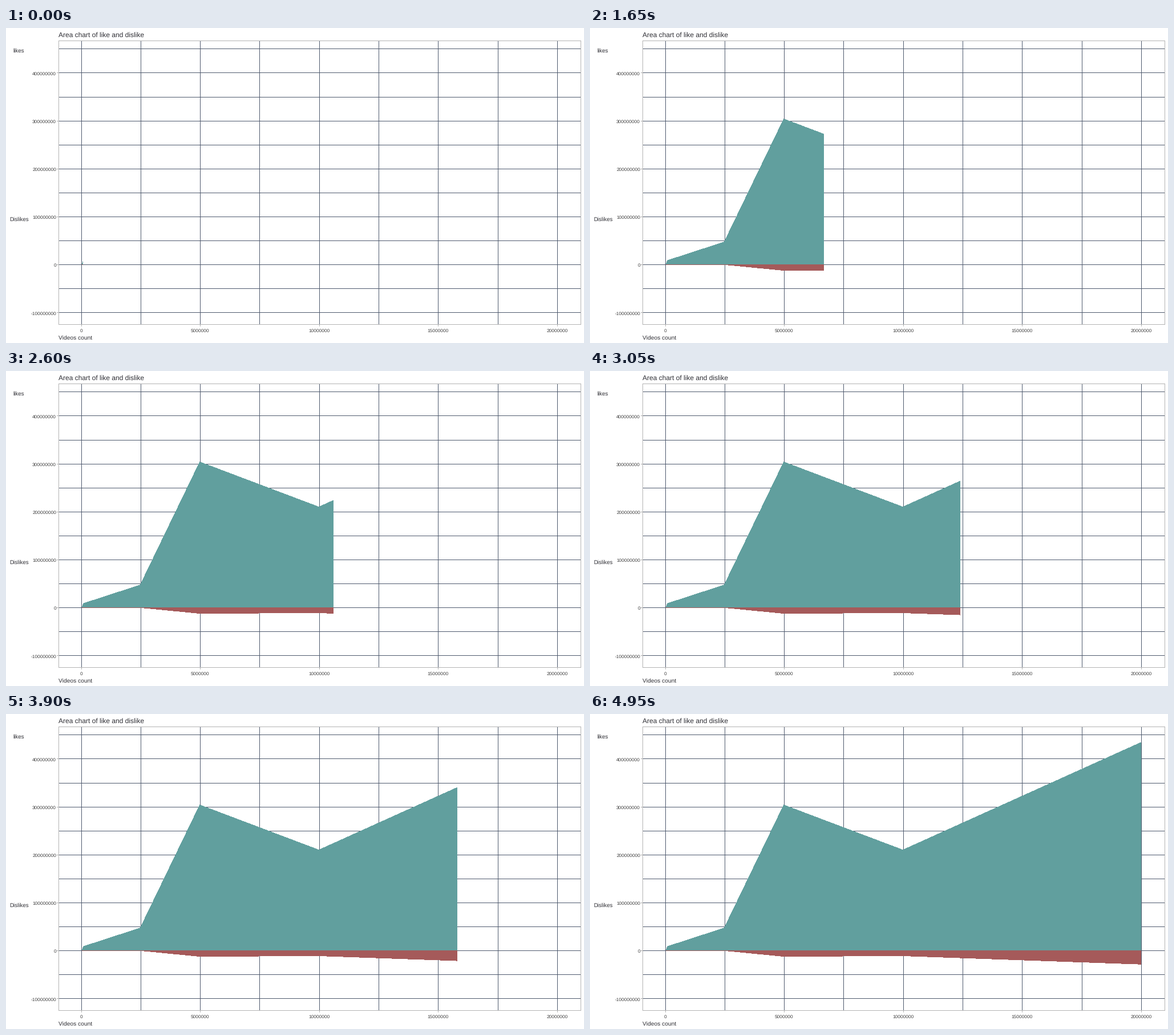
A matplotlib script for the animation above (5 s loop, 1013 by 553 pixels).

```python
import numpy as np
import matplotlib.pyplot as plt
from matplotlib.animation import FuncAnimation
from matplotlib.patches import Polygon, Rectangle

W, H, DPI = 1013, 553, 64
FRAMES, INTERVAL = 100, 50
LEFT, RIGHT, TOP, BOTTOM = 92, 1007, 22, 520
GRID, BORDER = "#4f5a6e", "#b3b3b3"
TEAL, RED = "#619f9e", "#a55a5a"
ZERO_Y = 415

# Chart data in stage pixels, and the frame at which each point is reached
KEY_X = [134.9, 235.4, 339.7, 548.3, 965.5]
KEY_FRAME = [0, 12, 25, 49, 99]
LIKES = [(133.4, 415), (134.9, 410.5), (136, 408.2), (235.4, 375.8),
         (339.7, 159.9), (548.3, 238.9), (965.5, 50.2)]
DISLIKES = [(133.4, 415.1), (235.4, 415.3), (339.7, 425.5),
            (548.3, 424.5), (965.5, 439.2)]

plt.rcParams["font.family"] = "Liberation Sans"
plt.rcParams["text.hinting"] = "none"
fig = plt.figure(figsize=(W / DPI, H / DPI), dpi=DPI, facecolor="white")
ax = fig.add_axes([0, 0, 1, 1])
ax.set_xlim(0, W)
ax.set_ylim(H, 0)
ax.axis("off")


def box(x, y, w, h, color, z=1):
    ax.add_patch(Rectangle((x, y), w, h, fc=color, lw=0, zorder=z,
                           antialiased=False))


def label(x, y, text, px, color="#303036", ha="left"):
    ax.text(x, y, text, fontsize=px * 72 / DPI, color=color, ha=ha,
            va="baseline")


def draw_axes():
    for i in range(9):
        x = round(131.6 + 104.3 * i)
        box(x, TOP, 1, BOTTOM - TOP, GRID)
        if i % 2 == 0:
            box(x, BOTTOM + 1, 1, 3, BORDER)
            label(x, 534, str(2500000 * i), 8.4, "#404040", "center")
    for i in range(12):
        y = 36.4 + 42.09 * i
        row = round(y)
        box(LEFT, row, RIGHT - LEFT, 1, GRID)
        if i % 2:
            box(LEFT - 3, row, 3, 1, BORDER)
            label(88, round(y + 4.2), str(50000000 * (9 - i)), 8.4, "#404040",
                  "right")
    for x in (LEFT, RIGHT):
        box(x, TOP, 1, BOTTOM - TOP + 1, BORDER, 4)
    for y in (TOP, BOTTOM):
        box(LEFT, y, RIGHT - LEFT + 1, 1, BORDER, 4)
    label(92, 16, "Area chart of like and dislike", 12.05)
    label(92, 547, "Videos count", 10.25)
    label(12, 43, "likes", 9.8)
    label(6.5, 339, "Dislikes", 9.8)


def area(color, z):
    patch = Polygon([(0, 0)] * 3, closed=True, fc=color, lw=0, zorder=z,
                    antialiased=False)
    return ax.add_patch(patch)


def reveal(points, edge):
    """Outline of the area under the points, cut off at x = edge."""
    xs, ys = zip(*points)
    shown = [p for p in points if p[0] < edge]
    shown.append((edge, np.interp(edge, xs, ys)))
    return [(xs[0], ZERO_Y), *shown, (edge, ZERO_Y)]


draw_axes()
likes = area(TEAL, 2)
dislikes = area(RED, 3)


def update(frame):
    edge = np.interp(frame, KEY_FRAME, KEY_X)
    likes.set_xy(reveal(LIKES, edge))
    dislikes.set_xy(reveal(DISLIKES, edge))
    return likes, dislikes


anim = FuncAnimation(fig, update, frames=FRAMES, interval=INTERVAL,
                     repeat=True, repeat_delay=0)
plt.show()
```
